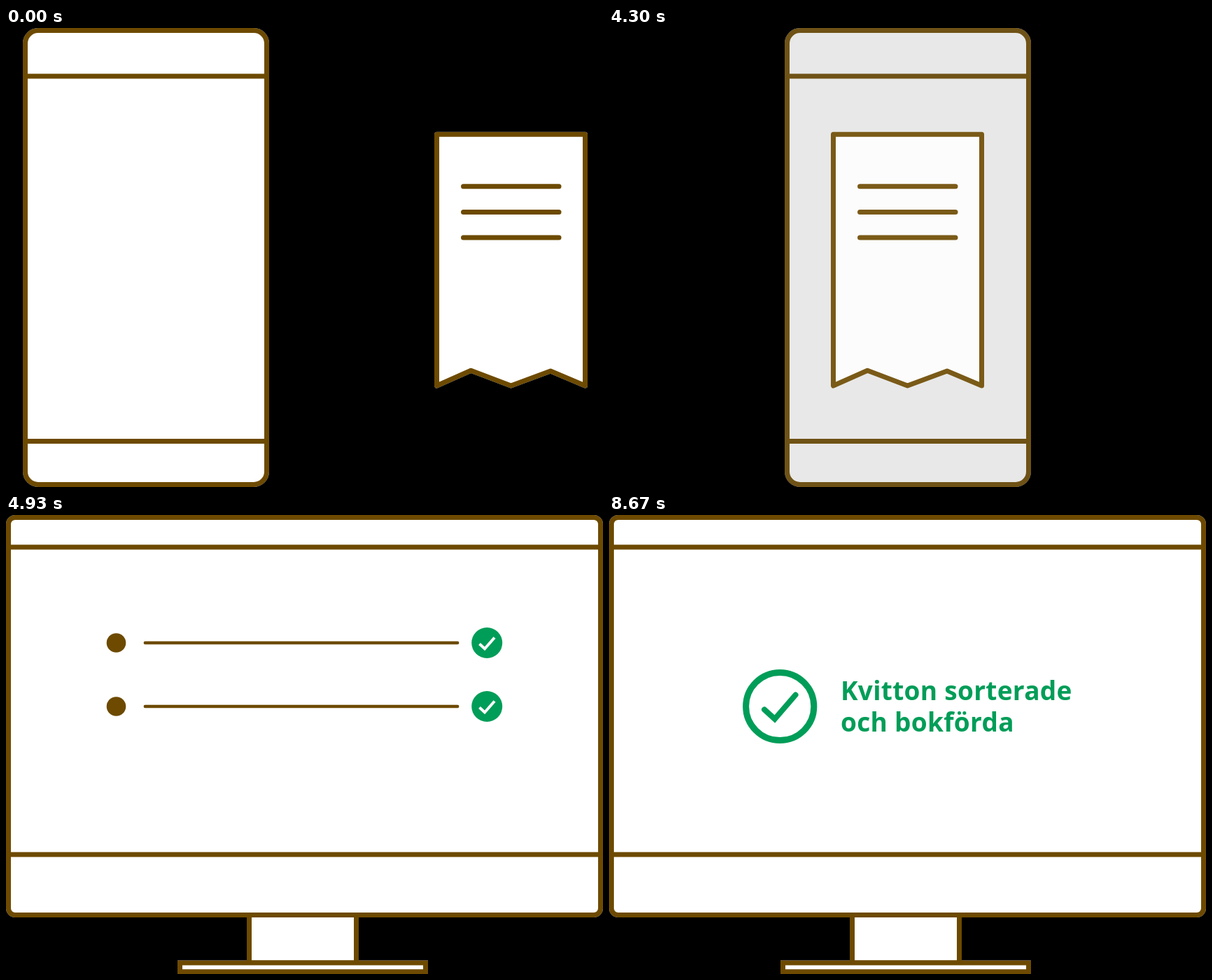
Recreate the animation shown at these times as an HTML page with a canvas. Size 853x657 px, loop 9.67 s.

```html
<!DOCTYPE html>
<html lang="sv">
<head>
<meta charset="utf-8">
<style>
  html, body { margin: 0; width: 100%; height: 100%; overflow: hidden; background: #000; }
  canvas { display: block; }
</style>
</head>
<body>
<canvas id="stage" width="853" height="657"></canvas>
<script>
const LOOP = 9670, STEP = 30;
const BROWN = '#6d4a00', GREEN = '#009d58', WHITE = '#fff';
const ROWS = [183, 274, 365];

const stage = document.getElementById('stage');
const out = stage.getContext('2d');
const scene = offscreen();
const g = offscreen();

function offscreen() {
  const canvas = document.createElement('canvas');
  canvas.width = stage.width;
  canvas.height = stage.height;
  return canvas.getContext('2d');
}

// Linear progress in whole steps; the first step is already visible at start.
function progress(t, start, steps) {
  const done = Math.floor((t - start) / STEP) + 1;
  return Math.min(1, Math.max(0, done / steps));
}

const mix = (a, b, p) => a + (b - a) * p;

// Draws a group on its own layer so that it fades as one piece.
function layer(alpha, x, draw) {
  if (alpha <= 0) return;
  g.setTransform(1, 0, 0, 1, 0, 0);
  g.clearRect(0, 0, stage.width, stage.height);
  g.translate(x, 0);
  draw();
  scene.globalAlpha = alpha;
  scene.drawImage(g.canvas, 0, 0);
}

function fillStage(color, mode) {
  out.globalCompositeOperation = mode;
  out.fillStyle = color;
  out.fillRect(0, 0, stage.width, stage.height);
}

function drawScene(mode) {
  out.globalCompositeOperation = mode;
  out.drawImage(scene.canvas, 0, 0);
}

// Colours are matted on white, then cut by the scene's coverage over black.
function present() {
  fillStage(WHITE, 'copy');
  drawScene('source-over');
  drawScene('destination-in');
  fillStage('#000', 'destination-over');
}

function pen(color, width, cap = 'butt', join = 'miter') {
  g.strokeStyle = color;
  g.lineWidth = width;
  g.lineCap = cap;
  g.lineJoin = join;
}

function trace(points, closed) {
  g.beginPath();
  points.forEach(([x, y]) => g.lineTo(x, y));
  if (closed) g.closePath();
}

function line(...points) {
  trace(points);
  g.stroke();
}

function box(x, y, w, h, r = 0) {
  g.beginPath();
  g.roundRect(x, y, w, h, r);
  g.fillStyle = WHITE;
  g.fill();
  g.stroke();
}

function disc(x, y, r, color) {
  g.beginPath();
  g.arc(x, y, r, 0, Math.PI * 2);
  g.fillStyle = color;
  g.fill();
}

function phone() {
  pen(BROWN, 7);
  box(3.5, 3.5, 345, 650, 18.5);
  line([3.5, 69], [348.5, 69]);
  line([3.5, 591.5], [348.5, 591.5]);
}

function receipt() {
  pen(BROWN, 7, 'round', 'round');
  trace([[3.5, 152.2], [215.5, 152.2], [215.5, 512], [166, 491],
         [109.5, 512], [52.3, 490.3], [3.5, 512]], true);
  g.fillStyle = WHITE;
  g.fill();
  g.stroke();
  for (const y of [226.8, 263.5, 300]) line([41.5, y], [178, y]);
}

function monitor() {
  pen(BROWN, 7);
  box(347.5, 572.5, 153, 68.5);
  box(248.5, 641, 351, 12.7);
  box(3.5, 3.5, 846, 569, 9.5);
  line([3.5, 46], [849.5, 46]);
  line([3.5, 486], [849.5, 486]);
}

const dot = y => disc(157.5, y, 13.8, BROWN);

function rule(y, p = 1) {
  pen(BROWN, 4.4, 'round');
  line([198.8, y], [mix(198.8, 645.2, p), y]);
}

function badge(y) {
  disc(687.2, y, 22, GREEN);
  pen(WHITE, 4);
  line([676.5, y + 1.5], [684, y + 8.5], [698, y - 7.5]);
}

function message() {
  pen(GREEN, 9, 'round');
  g.beginPath();
  g.arc(244.2, 274, 48.6, 0, Math.PI * 2);
  g.stroke();
  pen(GREEN, 8, 'round');
  line([222, 278.5], [236.8, 292], [266.5, 257.5]);
  g.fillStyle = GREEN;
  g.font = '700 37px "Open Sans", "Noto Sans", sans-serif';
  g.letterSpacing = '0.3px';
  g.fillText('Kvitton sorterade', 331, 265);
  g.fillText('och bokförda', 331, 310);
}

function render(t) {
  scene.clearRect(0, 0, stage.width, stage.height);

  const slide = progress(t, 500, 11);
  const phoneAlpha = 1 - progress(t, 4300, 11);
  const blink = 1 - progress(t, 1800, 7) + progress(t, 2180, 5);
  layer(phoneAlpha, mix(24, 251, slide), phone);
  layer(phoneAlpha * blink, mix(612, 317, slide), receipt);

  const monitorAlpha = progress(t, 4630, 11);
  const listAlpha = 1 - progress(t, 8040, 11);
  const lineGrowth = progress(t, 5760, 11);
  layer(monitorAlpha, 0, monitor);
  layer(monitorAlpha * listAlpha, 0, () => {
    for (const y of ROWS.slice(0, 2)) {
      dot(y);
      rule(y);
      badge(y);
    }
  });
  layer(progress(t, 4960, 11) * listAlpha, 0, () => dot(ROWS[2]));
  if (lineGrowth > 0) layer(listAlpha, 0, () => rule(ROWS[2], lineGrowth));
  layer(progress(t, 6390, 6) * listAlpha, 0, () => badge(ROWS[2]));
  layer(progress(t, 8370, 11), 0, message);

  present();
}

const begin = performance.now();
function tick() {
  render((performance.now() - begin) % LOOP);
  requestAnimationFrame(tick);
}
tick();
</script>
</body>
</html>
```
